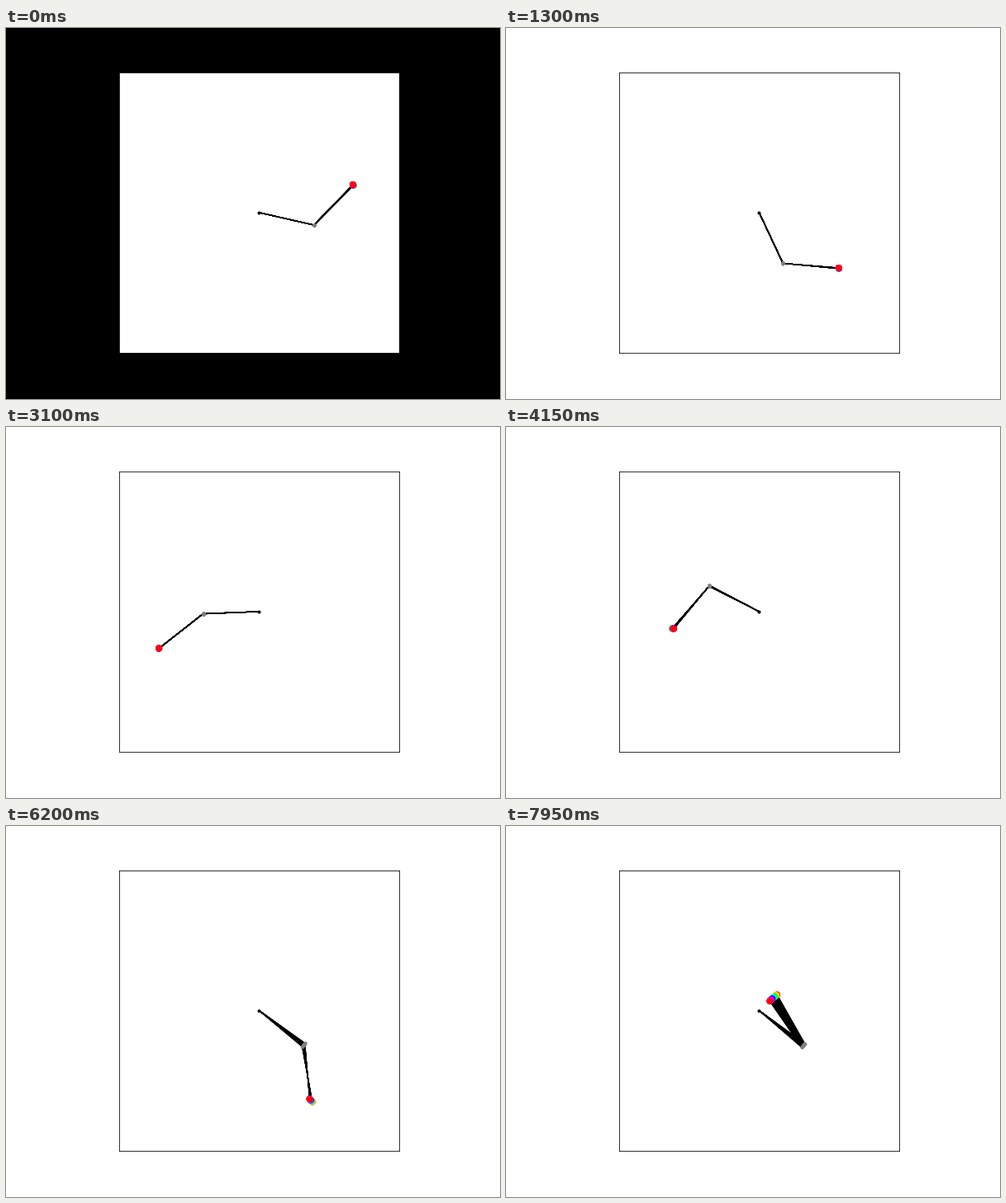
Animation, 598 px wide and 450 px high, one loop 8000 ms. Source, as a matplotlib script:

```python
import numpy as np
import matplotlib.pyplot as plt
from matplotlib.animation import FuncAnimation
from matplotlib.collections import LineCollection

W, H, DPI = 598, 450, 72
FRAMES, INTERVAL = 160, 50
DT, SUBSTEPS = 0.02, 8
G = 9.81
N = 50
SPREAD = 0.02


def derivs(s):
    """Two equal masses on rods of unit length."""
    a, wa, b, wb = s
    c, d = np.cos(a - b), np.sin(a - b)
    den = 1 + d ** 2
    acc_a = (G * np.sin(b) * c - d * (wa ** 2 * c + wb ** 2)
             - 2 * G * np.sin(a)) / den
    acc_b = (2 * (wa ** 2 * d - G * np.sin(b) + G * np.sin(a) * c)
             + wb ** 2 * d * c) / den
    return np.array([wa, acc_a, wb, acc_b])


def rk4(s, h):
    k1 = derivs(s)
    k2 = derivs(s + h / 2 * k1)
    k3 = derivs(s + h / 2 * k2)
    k4 = derivs(s + h * k3)
    return s + h / 6 * (k1 + 2 * k2 + 2 * k3 + k4)


def simulate():
    rest = np.zeros(N)
    s = np.array([rest + 3 * np.pi / 7, rest,
                  3 * np.pi / 4 + np.linspace(0, SPREAD, N), rest])
    states = [s]
    for _ in range(FRAMES - 1):
        for _ in range(SUBSTEPS):
            s = rk4(s, DT / SUBSTEPS)
        states.append(s)
    return states


states = simulate()

fig, ax = plt.subplots(figsize=(W / DPI, H / DPI), dpi=DPI)
fig.subplots_adjust(left=0.125, right=0.9, bottom=0.125, top=0.88)
ax.set(xlim=(-2.5, 2.5), ylim=(-2.5, 2.5), xticks=[], yticks=[])
ax.set_aspect("equal")

rods = LineCollection([], colors="k", linewidths=1, zorder=2)
ax.add_collection(rods)
ax.scatter([0], [0], s=4 ** 2, c="k", lw=0, zorder=5)
joints = ax.scatter(np.zeros(N), np.zeros(N), s=3.6 ** 2, c="gray", lw=0,
                    zorder=6)
bobs = ax.scatter(np.zeros(N), np.zeros(N), s=7.8 ** 2, lw=0, zorder=7,
                  c=plt.cm.hsv(np.linspace(0, 1, N)))


def update(i):
    a, _, b, _ = states[i]
    joint = np.column_stack([np.sin(a), -np.cos(a)])
    bob = joint + np.column_stack([np.sin(b), -np.cos(b)])
    rods.set_segments(np.stack([np.zeros_like(joint), joint, bob], axis=1))
    joints.set_offsets(joint)
    bobs.set_offsets(bob)
    fig.set_facecolor("k" if i == 0 else "w")
    return rods, joints, bobs


anim = FuncAnimation(fig, update, frames=FRAMES, interval=INTERVAL,
                     repeat=True, repeat_delay=0)
plt.show()
```
